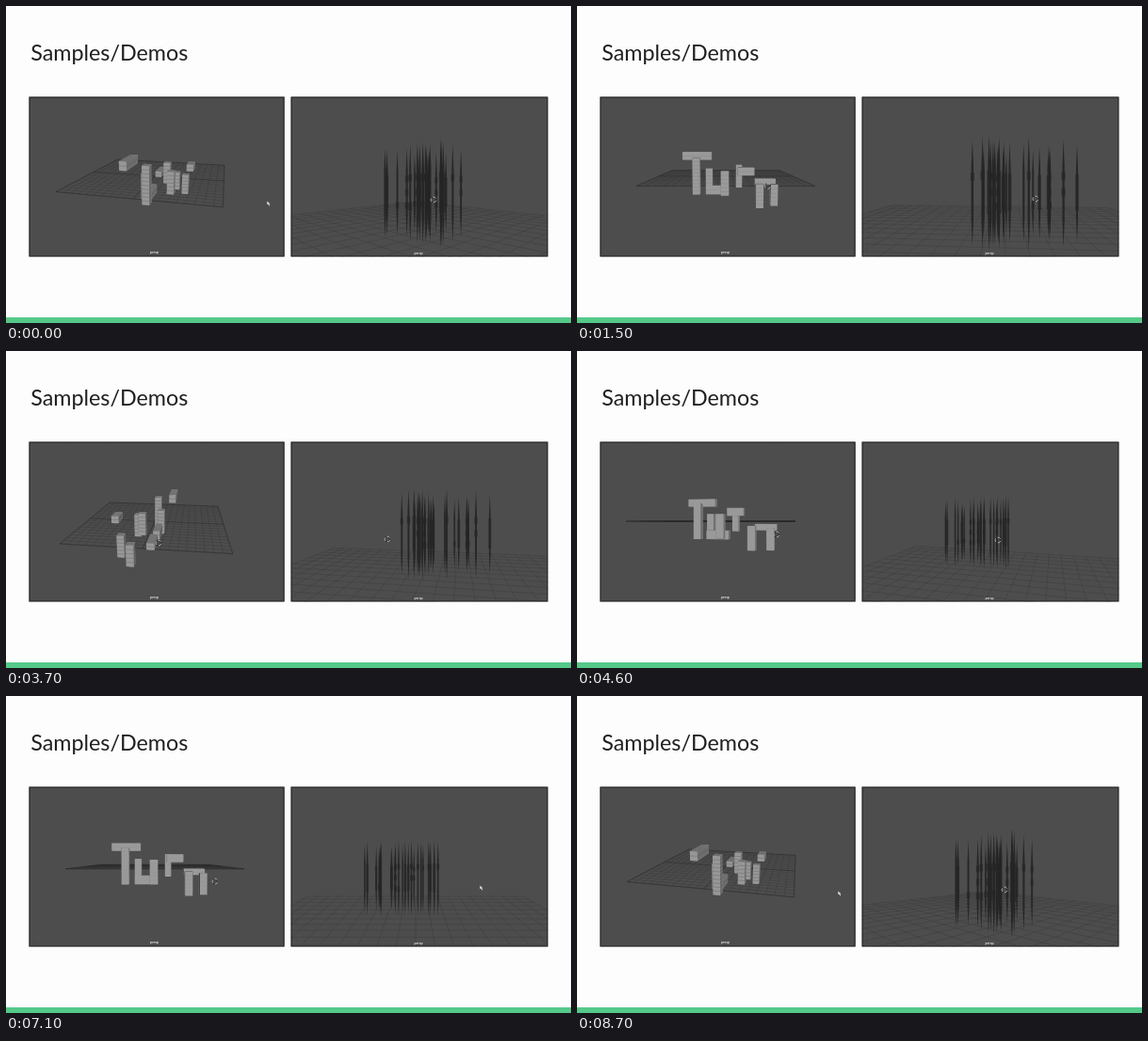
An HTML page with a canvas for the animation above (8800 ms loop, 600x337 px).

```html
<!DOCTYPE html>
<html lang="en">
<head>
<meta charset="utf-8">
<title>Samples/Demos</title>
<style>
  html, body { margin: 0; width: 100%; height: 100%; overflow: hidden; background: #fdfdfd; }
  h1 {
    position: absolute; left: 26.3px; top: 35px; margin: 0;
    font: 400 23.3px/29px Lato, "Open Sans", sans-serif; color: #202020; white-space: nowrap;
  }
  canvas { position: absolute; left: 0; top: 0; }
  footer { position: absolute; left: 0; top: 331px; width: 600px; height: 6px; background: #55c98a; }
</style>
</head>
<body>
<h1>Samples/Demos</h1>
<canvas id="stage" width="600" height="337"></canvas>
<footer></footer>
<script>
const LOOP = 8800, STEP = 100;
const ctx = document.getElementById('stage').getContext('2d');

const rad = deg => deg * Math.PI / 180;
const mix = (a, b, k) => a + (b - a) * k;
const mixAll = (a, b, k) => a.map((v, i) => mix(v, b[i], k));
const noise = i => { const v = Math.sin(i * 12.9898 + 4.1) * 43758.5453; return v - Math.floor(v); };

// Linear track of [time, ...values].
function track(keys, t) {
  let i = 0;
  while (i < keys.length - 2 && keys[i + 1][0] <= t) i++;
  const [a, b] = [keys[i], keys[i + 1]];
  const k = Math.min(1, Math.max(0, (t - a[0]) / (b[0] - a[0])));
  return mixAll(a.slice(1), b.slice(1), k);
}

function turn(x, z, yaw) {
  const c = Math.cos(yaw), s = Math.sin(yaw);
  return [x * c + z * s, z * c - x * s];
}

function line([x1, y1], [x2, y2]) {
  ctx.moveTo(x1, y1);
  ctx.lineTo(x2, y2);
}

function stroke(color, width, draw) {
  ctx.beginPath();
  ctx.strokeStyle = color;
  ctx.lineWidth = width;
  draw();
  ctx.stroke();
}

function fillShape(color, points) {
  ctx.beginPath();
  ctx.fillStyle = color;
  points.forEach(([x, y]) => ctx.lineTo(x, y));
  ctx.fill();
}

// Calls draw for both families of lines of a square grid from -1 to 1.
function gridLines(n, draw) {
  for (let i = 0; i <= n; i++) {
    const p = i / n * 2 - 1;
    draw([p, -1], [p, 1]);
    draw([-1, p], [1, p]);
  }
}

function panel(x, w, draw) {
  const y = 96.4, h = 170.2;
  ctx.save();
  ctx.beginPath();
  ctx.rect(x, y, w, h);
  ctx.clip();
  ctx.fillStyle = '#4d4d4d';
  ctx.fillRect(x, y, w, h);
  draw();
  stroke('#2d2d2d', 2.6, () => ctx.rect(x, y, w, h));
  ctx.restore();
}

function caption(x, y) {
  ctx.fillStyle = '#dedede';
  ctx.font = 'bold 3.4px "Liberation Sans", sans-serif';
  ctx.textAlign = 'center';
  ctx.fillText('persp', x, y);
}

function axes(x, y, yaw) {
  const tip = a => [x + 4 * Math.cos(a), y + 2 * Math.sin(a)];
  stroke('#6a4a44', .6, () => line([x, y], tip(yaw)));
  stroke('#44496a', .6, () => line([x, y], tip(yaw + Math.PI / 2)));
  stroke('#46604a', .6, () => line([x, y], [x, y - 4]));
}

function cursor([x, y], arrow) {
  if (arrow) {
    fillShape('#e2e2e2', [[x - 1.8, y - 2.4], [x + 1.4, y + .2], [x + .3, y + .4], [x + 1.2, y + 2.1], [x + .4, y + 2.4], [x - .5, y + .8], [x - 1.6, y + 1.1]]);
    return;
  }
  stroke('rgba(40,40,40,.7)', 1.4, () => ctx.arc(x, y, 2.6, 0, 7));
  for (const start of [.3, 2.4, 4.5])
    stroke('#d0d0d0', .8, () => { ctx.arc(x, y, 2.9, start, start + 1.3); });
}

/* Left: letters made of blocks, each at its own depth, seen by an orbiting camera. */

// [x, top, z, width, height]
const blocks = [
  [-.447, .355, .24, .45, .12], [-.436, .27, 0, .11, .54],
  [-.25, .11, .07, .1, .38], [-.126, -.14, .03, .34, .13], [-.013, .1, -.25, .11, .34],
  [.189, .18, -.15, .085, .32], [.264, .17, -.5, .21, .1],
  [.454, -.06, -.4, .1, .32], [.59, -.04, .05, .31, .09], [.68, -.09, -.22, .1, .3]
];
const DEPTH = .1;

// [time, yaw in degrees, pitch]
const orbit = [[0, -75.5, .27], [700, -38.3, .27], [1800, 14.5, .05], [2500, 14.5, .05],
  [3700, 98, .32], [4600, 14.5, 0], [5800, 4, .02], [6200, 4, .02], [6700, 0, .03],
  [7200, 0, .03], [8500, -75.5, .27]];

const leftCursor = [[0, 279, 210], [700, 209, 206], [1800, 200, 186], [2300, 223, 184],
  [2500, 223, 184], [3700, 162, 204], [4600, 212, 195], [6200, 222, 197], [8500, 222, 197],
  [8600, 212, 200], [8700, 279, 210]];

function blockFaces([x, top, z, w, h]) {
  const center = [x, top - h / 2, z], half = [w / 2, h / 2, DEPTH / 2];
  const faces = [];
  for (let axis = 0; axis < 3; axis++) {
    const v = axis === 1 ? 2 : 1, u = 3 - axis - v;
    for (const side of [-1, 1]) {
      const corners = [[-1, 1], [1, 1], [1, -1], [-1, -1]].map(([a, b]) => {
        const p = [...center];
        p[axis] += side * half[axis];
        p[u] += a * half[u];
        p[v] += b * half[v];
        return p;
      });
      faces.push({ axis, corners, rows: axis === 1 ? 0 : Math.round(h / .055) });
    }
  }
  return faces;
}
const faces = blocks.flatMap(blockFaces);

function drawBlocks(t) {
  const [deg, pitch] = track(orbit, t);
  const yaw = rad(deg), cp = Math.cos(pitch), sp = Math.sin(pitch);
  const project = ([x, y, z]) => {
    const [rx, rz] = turn(x, z, yaw);
    const d = 4 + rz * cp - y * sp;
    return [158 + 285 * rx / d, 181 - 285 * (y * cp + rz * sp) / d, d];
  };
  const ground = ([x, z]) => project([x, 0, z]);

  stroke('rgba(48,48,48,.5)', .6, () => gridLines(20, (a, b) => line(ground(a), ground(b))));
  stroke('rgba(35,35,35,.55)', .7, () => gridLines(2, (a, b) => line(ground(a), ground(b))));

  // Faces turned to the viewer are lightest.
  const facing = [Math.abs(Math.sin(yaw)) * cp, Math.abs(sp), Math.abs(Math.cos(yaw)) * cp];
  const shade = facing.map(f => 66 + 88 * Math.sqrt(f));
  const stripe = `rgba(60,60,60,${Math.min(.4, pitch * 1.5)})`;
  const depth = q => q.reduce((sum, p) => sum + p[2], 0);
  faces
    .map(f => ({ ...f, quad: f.corners.map(project) }))
    .sort((a, b) => depth(b.quad) - depth(a.quad))
    .forEach(({ axis, rows, quad }) => {
      const g = shade[axis];
      fillShape(`rgb(${g},${g},${g})`, quad);
      stroke(stripe, .6, () => {
        for (let i = 1; i < rows; i++)
          line(mixAll(quad[0], quad[3], i / rows), mixAll(quad[1], quad[2], i / rows));
      });
    });

  ctx.fillStyle = '#3a4266';
  for (const [x, w] of [[64, 6], [104, 3], [209, 3]]) ctx.fillRect(x, 97, w, .8);
  axes(33, 258, yaw);
  caption(157.5, 263);
  const spot = track(leftCursor, t);
  cursor(spot, spot[0] > 230);
}

/* Right: spikes whose cells line up to a word from the front. */

const word = [
  '.##....#####.#####.#####',
  '.##....##....##......##.',
  '.##....####..####....##.',
  '.##....##....##......##.',
  '.#####.#####.##......##.'
];
const spikes = Array.from(word[0], (_, i) => ({
  x: -53 + 3.57 * i,
  z: -6 + 88 * noise(i) ** 1.3,
  reach: 39 + 4 * noise(i + 50),
  cells: word.map(row => row[i] === '#')
}));

// [time, yaw in degrees, zoom, eye height]
const view = [[0, 45, 1.3, .3], [700, 95, 1.18, .35], [900, 95, 1.18, .35], [1800, 95, 1.38, .35],
  [2200, 95, 1.2, .35], [2500, 95, 1.2, .35], [3700, 100, 1.04, .5], [4600, 15, .95, .55],
  [5200, 0, 1, .59], [8500, 0, 1, .59], [8600, 45, 1.3, .3]];

const rightCursor = [[0, 454, 206], [700, 487, 205], [1800, 487, 205], [2200, 357, 198],
  [2500, 357, 198], [3700, 405, 200], [4600, 447, 201], [6800, 462, 203], [7100, 505, 204],
  [8500, 505, 204], [8600, 454, 206]];

function drawFloor(yaw, height) {
  const near = .2, dist = 1.31, f = 266;
  const horizon = 213 - f * height / (dist + 1);
  const place = ([x, z]) => {
    const [rx, rz] = turn(x, z, yaw);
    return [rx, rz + dist];
  };
  const screen = ([x, d]) => [435 + f * x / d, horizon + f * height / d];
  stroke('rgba(52,52,52,.45)', .7, () => gridLines(20, (from, to) => {
    const [a, b] = [place(from), place(to)].sort((p, q) => p[1] - q[1]);
    if (b[1] < near) return;
    const start = a[1] < near ? mixAll(a, b, (near - a[1]) / (b[1] - a[1])) : a;
    line(screen(start), screen(b));
  }));
}

function drawSpike({ x, z, reach, cells }, yaw, zoom) {
  const [rx, rz] = turn(x, z, yaw);
  const k = zoom / (1 + rz / 240);
  const cx = 430 + rx * k, mid = 178 + 16 * zoom;
  const r = reach * k, w = .85 * k, shoulder = r * .5;
  fillShape('rgba(36,36,36,.92)', [[cx, mid - r], [cx + w, mid - shoulder], [cx + w, mid + shoulder],
    [cx, mid + r], [cx - w, mid + shoulder], [cx - w, mid - shoulder]]);
  const cell = r * .15;
  ctx.fillStyle = 'rgba(38,38,38,.7)';
  cells.forEach((on, i) => {
    if (on) ctx.fillRect(cx - w * 1.7, mid + (i - 2.6) * cell, w * 3.4, cell);
  });
}

function drawSpikes(t) {
  const [deg, zoom, height] = track(view, t);
  const yaw = rad(deg);
  drawFloor(yaw, height);
  spikes.forEach(s => drawSpike(s, yaw, zoom));
  axes(311, 258, yaw);
  caption(438, 264);
  cursor(track(rightCursor, t), t > 6800 && t < 8600);
}

function frame(now) {
  const t = Math.floor(now % LOOP / STEP) * STEP;
  ctx.clearRect(0, 0, 600, 337);
  panel(24.4, 271.3, () => drawBlocks(t));
  panel(302.5, 273, () => drawSpikes(t));
}

const begin = performance.now();
function tick() {
  frame(performance.now() - begin);
  requestAnimationFrame(tick);
}
tick();
</script>
</body>
</html>
```
